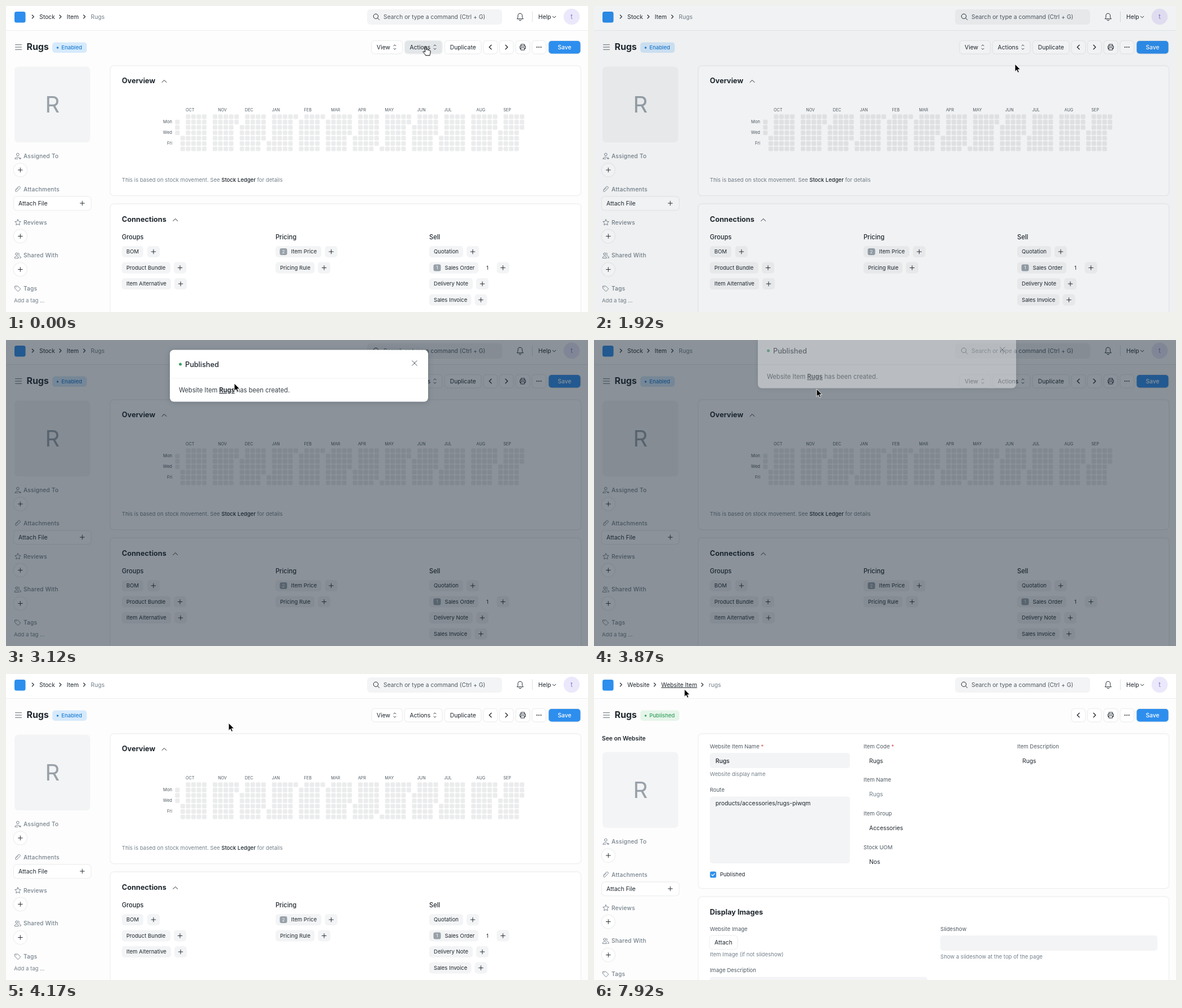
Animation of 1030 by 543 pixels, one loop 8000 ms. Source, as an HTML page:

```html
<!DOCTYPE html>
<html lang="en">
<head>
<meta charset="utf-8">
<title>Publish an item</title>
<style>
html, body { margin: 0; width: 100%; height: 100%; overflow: hidden; background: #fdfdfd; }
svg { display: block; width: 100vw; height: 100vh; }
text { font-family: Inter, Roboto, sans-serif; white-space: pre; }
.raised { filter: drop-shadow(0 .5px 1.2px rgba(25,39,52,.2)); }
.float { filter: drop-shadow(0 1px 4px rgba(25,39,52,.25)); }
</style>
</head>
<body>
<svg id="stage" viewBox="0 0 1030 543" xmlns="http://www.w3.org/2000/svg"></svg>
<script>
const INK = '#1f272e', SOFT = '#505a62', MUTED = '#74808b', FIELD = '#f3f4f5', BLUE = '#2d8eee', GREEN = '#38a160';
const SM = 9.55, MD = 10.33, LG = 11.1, XL = 12.7;

// Text is placed by its vertical centre.
const text = (x, y, s, { size = MD, weight = 400, fill = INK, anchor = 'start', extra = '' } = {}) =>
  `<text x="${x}" y="${y + size * .36}" font-size="${size}" font-weight="${weight}" fill="${fill}" text-anchor="${anchor}" ${extra}>${s}</text>`;
const rect = (x, y, w, h, r, fill, extra = '') =>
  `<rect x="${x}" y="${y}" width="${w}" height="${h}" rx="${r}" fill="${fill}" ${extra}/>`;
const circle = (x, y, r, fill, extra = '') => `<circle cx="${x}" cy="${y}" r="${r}" fill="${fill}" ${extra}/>`;
const line = (d, color = INK, w = 1) =>
  `<path d="${d}" fill="none" stroke="${color}" stroke-width="${w}" stroke-linecap="round" stroke-linejoin="round"/>`;
const group = (id, s) => `<g id="${id}">${s}</g>`;
const raised = 'class="raised"';

const plus = (x, y, r = 3.8) => line(`M${x - r} ${y}h${2 * r}M${x} ${y - r}v${2 * r}`, INK, .95);
const right = (x, y, r = 3, w = 1.1) => line(`M${x - r / 2} ${y - r}l${r} ${r}l${-r} ${r}`, INK, w);
const up = (x, y) => line(`M${x - 4} ${y + 2}l4 -4l4 4`, INK, 1);
const sorter = (x, y) => line(`M${x - 2} ${y - 2.2}l2 -2l2 2M${x - 2} ${y + 2.2}l2 2l2 -2`, INK, .9);
const button = (x, w, s = '', fill = '#fff') => rect(x, 62, w, 22.5, 5, fill, raised) + s;
const card = (y, h) => rect(185, y, 832, h, 6, '#fff', raised);
const heading = (y, s) => text(205, y, s, { size: XL, weight: 700 });

function crumbs(id, items) {
  return group(id, items.map(([x, s], i) =>
    right(x - 11.3, 19) + text(x, 19, s, { fill: i === 2 ? MUTED : INK, extra: `id="${id}${i}"` })).join(''));
}

function navbar() {
  return rect(0, 0, 1030, 43, 0, '#fff') + line('M0 43.5H1030', '#ebeef0') +
    rect(15, 10, 19.5, 19.5, 3.5, BLUE) +
    rect(639, 6, 239, 27, 6, FIELD) + circle(654.5, 18.3, 4.2, 'none', `stroke="${INK}"`) + line('M657.7 21.5l3 3') +
    text(668, 19, 'Search or type a command (Ctrl + G)', { fill: SOFT }) +
    line('M904.5 22.5C906 21 906 20 906 17.5A3.8 4.3 0 0 1 913.6 17.5C913.6 20 913.6 21 915.2 22.5ZM908 24.5a2 2 0 0 0 3.8 0') +
    line('M931.5 10v18', '#d5dade', .8) + text(942, 19, 'Help') + line('M967.5 18.2l2.7 2.7l2.7 -2.7') +
    circle(1001, 19, 14.3, '#ece8fb') + text(1001, 19, 't', { size: LG, fill: '#8673d4', anchor: 'middle' });
}

function pageHead(status, color, fill, w) {
  return line('M16.5 68.7h11M16.5 73h11M16.5 77.3h11', SOFT, .9) +
    text(36.5, 72.5, 'Rugs', { size: 15.9, weight: 700 }) +
    rect(82, 64.5, w, 18.5, 5, fill) + circle(91.3, 74, 1.7, color) +
    text(98, 74, status, { size: SM, weight: 500, fill: color }) +
    button(845.5, 23.5, line('M859 69.3l-3.8 3.7l3.8 3.7', INK, 1.3)) +
    button(874, 23.5, line('M884 69.3l3.8 3.7l-3.8 3.7', INK, 1.3)) +
    button(902.8, 23.5, line('M911.3 71v-3h6.4v3M911 75.5h-1.3v-4.5h9.6v4.5h-1.3M911.3 74h6.4v4h-6.4z')) +
    button(931.5, 23.5, [939.7, 943.2, 946.7].map(x => circle(x, 73, 1, INK)).join('')) +
    button(960.5, 56, text(988.5, 73, 'Save', { fill: '#fff', weight: 500, anchor: 'middle' }), BLUE);
}

function sidebar(dy) {
  const icons = {
    266: 'M18.5 263.5a2.3 2.3 0 1 0 4.6 0a2.3 2.3 0 1 0 -4.6 0M16 271.2c0-4 7-4 8 -1.2M16 271.2h5M23.5 270.5h3M25 269v3',
    325: 'M16.5 326l5-5c2-2 5 .5 3.2 2.7l-5.5 5.3c-1.5 1.5-3.5-.5-2-2l4.6-4.5',
    384: 'M21 378.8l1.6 3.3l3.6 .5l-2.6 2.6l.6 3.6l-3.2-1.7l-3.2 1.7l.6-3.6l-2.6-2.6l3.6-.5z',
    442.5: 'M16.8 440a2 2 0 1 0 4 0a2 2 0 1 0 -4 0M15.2 447c0-4.5 7-4.5 7 0zM22 438.2a2 2 0 0 1 0 3.8M23 443.2c2.5 .2 3.3 2 3.3 3.8h-2',
    501.5: 'M16 497h4.8l5 5l-4.6 4.6l-5.2-5.2zM18 499h.3'
  };
  const names = ['Assigned To', 'Attachments', 'Reviews', 'Shared With', 'Tags'];
  const labels = Object.keys(icons).map(Number).sort((a, b) => a - b).map((y, i) =>
    line(icons[y], MUTED, .95) + text(31, y, names[i], { size: 10.15, weight: 500, fill: MUTED, extra: 'letter-spacing=".02em"' })).join('');
  const adders = [291, 408.5, 467.5].map(y => circle(25.3, y, 11.5, '#fff', raised) + plus(25.3, y)).join('');
  return `<g transform="translate(0 ${dy})">` + rect(15, 107.5, 134, 134.5, 7, FIELD) +
    text(82, 174.5, 'R', { size: 40, fill: '#98a1a9', anchor: 'middle' }) + labels + adders +
    rect(14, 338.5, 136, 23.5, 5, '#fff', raised) + text(22, 350, 'Attach File') + plus(135, 350) +
    text(14, 523, 'Add a tag ...', { size: SM, fill: MUTED }) + '</g>';
}

// One cell per day; each month opens a new column, after a gap if the last one ended on a Saturday.
function heatmap() {
  const pitch = 9.53, cellX = c => 299.2 + c * pitch;
  let out = '', col = 0;
  for (let i = 0; i <= 365; i++) {
    const day = new Date(Date.UTC(2020, 8, 28 + i)), row = day.getUTCDay();
    if (i && row === 0) col++;
    if (day.getUTCDate() === 1) {
      col++;
      const name = day.toLocaleString('en-US', { month: 'short', timeZone: 'UTC' }).toUpperCase();
      out += text(cellX(col + 1) - .3, 184, name, { size: 7.2, fill: SOFT });
    }
    out += rect(cellX(col).toFixed(2), (192.3 + row * pitch).toFixed(2), 8.1, 8.1, 2, '#ebeced');
  }
  ['Mon', 'Wed', 'Fri'].forEach((d, i) => out += text(294, 205.5 + i * 2 * pitch, d, { size: 7.6, fill: SOFT, anchor: 'end' }));
  return out;
}

function link(x, y, w, s, count) {
  const badge = count ? rect(x + 7.5, y - 6, 13, 12, 3, '#98a1a9') +
    text(x + 14, y, count, { size: 8, fill: '#fff', anchor: 'middle' }) : '';
  return rect(x, y - 10, w, 20, 5, FIELD) + badge + text(x + (count ? 27.5 : 8), y, s, { size: SM });
}
const linkPlus = (x, y) => rect(x - 11, y - 10, 22, 20, 5, FIELD) + plus(x, y);

function itemPage() {
  const rows = [436, 464.5, 493, 521.5];
  const links = [
    [205, 0, 38, 'BOM', 261], [205, 1, 86, 'Product Bundle', 308], [205, 2, 87, 'Item Alternative', 309],
    [477, 0, 81, 'Item Price', 575.5, 2], [477, 1, 69, 'Pricing Rule', 563],
    [749, 0, 60, 'Quotation', 826], [749, 1, 87, 'Sales Order', 879.5, 1],
    [749, 2, 77, 'Delivery Note', 843], [749, 3, 74.5, 'Sales Invoice', 840.5]
  ];
  return crumbs('item', [[59, 'Stock'], [107.5, 'Item'], [150, 'Rugs']]) +
    pageHead('Enabled', '#1f7fd6', '#d6eafc', 61) +
    button(647.5, 53.5, text(656, 73, 'View') + sorter(688, 73)) +
    button(706, 65.5, rect(706, 62, 65.5, 22.5, 5, '#e3e6e8', 'id="hot"') + text(714.5, 73, 'Actions') + sorter(759, 73)) +
    button(777, 63.5, text(808.7, 73, 'Duplicate', { anchor: 'middle' })) +
    sidebar(0) + card(106.5, 229.5) + heading(132, 'Overview') + up(280, 133.5) + heatmap() +
    text(205, 309, `This is based on stock movement. See <tspan fill="${INK}" font-weight="500">Stock Ledger</tspan> for details`, { size: SM, fill: MUTED }) +
    card(351.5, 220) + heading(378, 'Connections') + up(299.7, 379.5) +
    [[205, 'Groups'], [477, 'Pricing'], [749, 'Sell']].map(([x, s]) => text(x, 410.5, s, { size: LG, weight: 500 })).join('') +
    links.map(([x, r, w, s, px, n]) => link(x, rows[r], w, s, n) + linkPlus(px, rows[r])).join('') +
    text(852, 464.5, '1', { size: SM, anchor: 'middle' });
}

function formPage() {
  const label = (x, y, s, needed) => text(x, y, s + (needed ? ' <tspan fill="#e24c4c">*</tspan>' : ''), { size: SM, fill: SOFT });
  const help = (x, y, s) => text(x, y, s, { size: SM, fill: MUTED });
  return crumbs('web', [[59, 'Website'], [119, 'Website Item'], [203, 'rugs']]) +
    pageHead('Published', GREEN, '#e6f5ea', 69) +
    text(14, 114, 'See on Website', { weight: 600 }) + sidebar(31) + card(106.5, 273.5) +
    label(205, 128.5, 'Website Item Name', true) + rect(205, 140, 248, 27, 5, FIELD) + text(215, 154, 'Rugs', { weight: 500 }) +
    help(205, 178, 'Website display name') + label(205, 206, 'Route') + rect(205, 217.5, 248, 118.5, 5, FIELD) +
    text(215, 229.5, 'products/accessories/rugs-piwqm') +
    rect(205.3, 350.5, 11, 11, 2.5, BLUE) + line('M208.2 356l1.9 2l3.4 -3.8', '#fff', 1.2) + text(223, 356, 'Published', { size: SM }) +
    label(477, 128.5, 'Item Code', true) + text(487, 154, 'Rugs') +
    label(477, 188, 'Item Name') + text(487, 213.5, 'Rugs', { fill: MUTED }) +
    label(477, 248, 'Item Group') + text(487, 273, 'Accessories') +
    label(477, 307.5, 'Stock UOM') + text(487, 333, 'Nos') +
    label(749, 128.5, 'Item Description') + text(758, 154.5, 'Rugs') +
    card(395.5, 180) + heading(422, 'Display Images') + label(205, 453, 'Website Image') +
    rect(205, 464.5, 48.5, 23.5, 5, '#fff', raised) + text(229, 476, 'Attach', { anchor: 'middle' }) +
    help(205, 498, 'Item Image (if not slideshow)') + label(205, 526, 'Image Description') + rect(205, 537.5, 385, 30, 5, FIELD) +
    label(613, 453, 'Slideshow') + rect(613, 464, 384, 27, 5, FIELD) + help(613, 501.5, 'Show a slideshow at the top of the page');
}

const menu = rect(706, 89, 161, 69, 6, '#fff', 'class="float"') + rect(712, 95, 149, 27, 5, FIELD, 'id="menuHot"') +
  text(721, 108.5, 'Publish in Website') + text(721, 138.5, 'Add / Edit Prices');

const modal = rect(290, 17.5, 457, 92, 7, '#fff', 'class="float"') + line('M290 68H747', '#ebeef0', .8) +
  circle(308.5, 43, 2.5, GREEN) + text(317, 43, 'Published', { size: XL, weight: 500 }) +
  line('M718.7 36.7l8.6 8.6m0 -8.6l-8.6 8.6', SOFT, 1) +
  text(306, 89, `Website Item <tspan font-weight="700" fill="${INK}" text-decoration="underline">Rugs</tspan> has been created.`, { size: LG, fill: '#333c44' });

const pointers = {
  arrow: '<path d="M0 0V13.4L3.1 10.6L5.1 15.3L7.4 14.3L5.4 9.8H9.6Z" fill="#000" stroke="#fff" stroke-width=".9"/>',
  hand: '<path d="M-1.4 1C-1.4-.6 1.1-.6 1.1 1V5.2C2-.0 4.5 5 3.8 5.6C4.6 4.6 6 5 6.1 6.3C7 5.6 8.4 6 8.2 7.6C8.2 11 7.4 11.5 7 14.8H-.2C-1 12.6-3.6 10.6-4.8 8.6C-5.2 7-3.2 6.6-1.4 9Z" fill="#fff" stroke="#000" stroke-width="1"/>',
  beam: '<path d="M-3 -6.5Q0 -6.5 0 -4.5Q0 -6.5 3 -6.5M0 -5V5M-3 6.5Q0 6.5 0 4.5Q0 6.5 3 6.5M-1.5 1.5H1.5" fill="none" stroke="#222" stroke-width="1.1"/>'
};

document.getElementById('stage').innerHTML = rect(0, 0, 1030, 543, 0, '#fdfdfd') + navbar() +
  group('itemPage', itemPage()) + group('formPage', formPage()) + group('menu', menu) +
  rect(0, 0, 1030, 543, 0, '#192734', 'id="shade"') + group('modal', modal) +
  group('pointer', Object.entries(pointers).map(([id, s]) => group(id, s)).join(''));

const $ = id => document.getElementById(id);
const show = (id, on) => $(id).setAttribute('visibility', on ? 'visible' : 'hidden');
const within = (t, a, b) => t >= a && t < b;

// Keys are [time, ...values], joined by straight lines.
function track(keys, t) {
  let i = 0;
  while (i < keys.length - 1 && keys[i + 1][0] <= t) i++;
  const a = keys[i], b = keys[i + 1] || a;
  const k = a === b ? 0 : (t - a[0]) / (b[0] - a[0]);
  return a.slice(1).map((v, j) => v + (b[j + 1] - v) * k);
}

const path = [
  [0, 743, 73], [440, 743, 73], [740, 727, 86], [890, 727, 97], [1040, 762, 104], [1190, 795, 104], [1340, 745, 103],
  [2370, 745, 103], [2520, 737, 101], [2670, 640, 82], [2970, 440, 56], [3120, 404, 77], [3270, 362, 92], [3570, 394, 87],
  [4320, 394, 87], [4470, 342, 170], [4620, 444, 281], [4920, 444, 281], [5070, 436, 285], [5970, 436, 285],
  [6270, 350, 190], [6570, 200, 55], [6720, 150, 19], [6870, 140, 18], [7020, 118, 62], [7170, 96, 97], [7320, 80, 95],
  [7620, 74, 19], [7770, 125, 19], [7920, 160, 27]
];
const dim = [[0, 0], [1620, 0], [1920, .06], [2220, .5], [3870, .5], [4020, .26], [4170, 0]];
const reveal = [[0, 0], [2220, 0], [2370, .6], [2520, 1], [3720, 1], [3870, .4], [4020, 0]];

function tick(t) {
  const start = t < 1500 ? 140 : 120;
  return Math.max(0, Math.floor((t - start) / 150) * 150 + start);
}

function render(ms) {
  const t = tick(ms);
  show('itemPage', t < 5070);
  show('formPage', t >= 5520);
  show('menu', within(t, 290, 1620));
  if (t >= 1620 || t < 290) show('menuHot', false);
  else show('menuHot', t >= 890);
  show('hot', t < 1620);

  $('shade').setAttribute('opacity', track(dim, t)[0]);
  const m = track(reveal, t)[0];
  $('modal').setAttribute('opacity', m);
  $('modal').setAttribute('transform', `translate(0 ${-40 * (1 - m)})`);

  const underline = (id, on) => $(id).setAttribute('text-decoration', on ? 'underline' : 'none');
  underline('web0', within(t, 7470, 7770));
  underline('web1', within(t, 6720, 7020) || t >= 7770);

  const [x, y] = track(path, t);
  $('pointer').setAttribute('transform', `translate(${x} ${y})`);
  const hand = t < 1620 || within(t, 3420, 3870) || within(t, 6720, 7020) || within(t, 7620, 7920);
  const beam = within(t, 5070, 6270);
  const kind = hand ? 'hand' : beam ? 'beam' : 'arrow';
  Object.keys(pointers).forEach(id => show(id, id === kind));
}

const began = performance.now();
function loop() {
  render((performance.now() - began) % 8000);
  requestAnimationFrame(loop);
}
loop();
</script>
</body>
</html>
```
